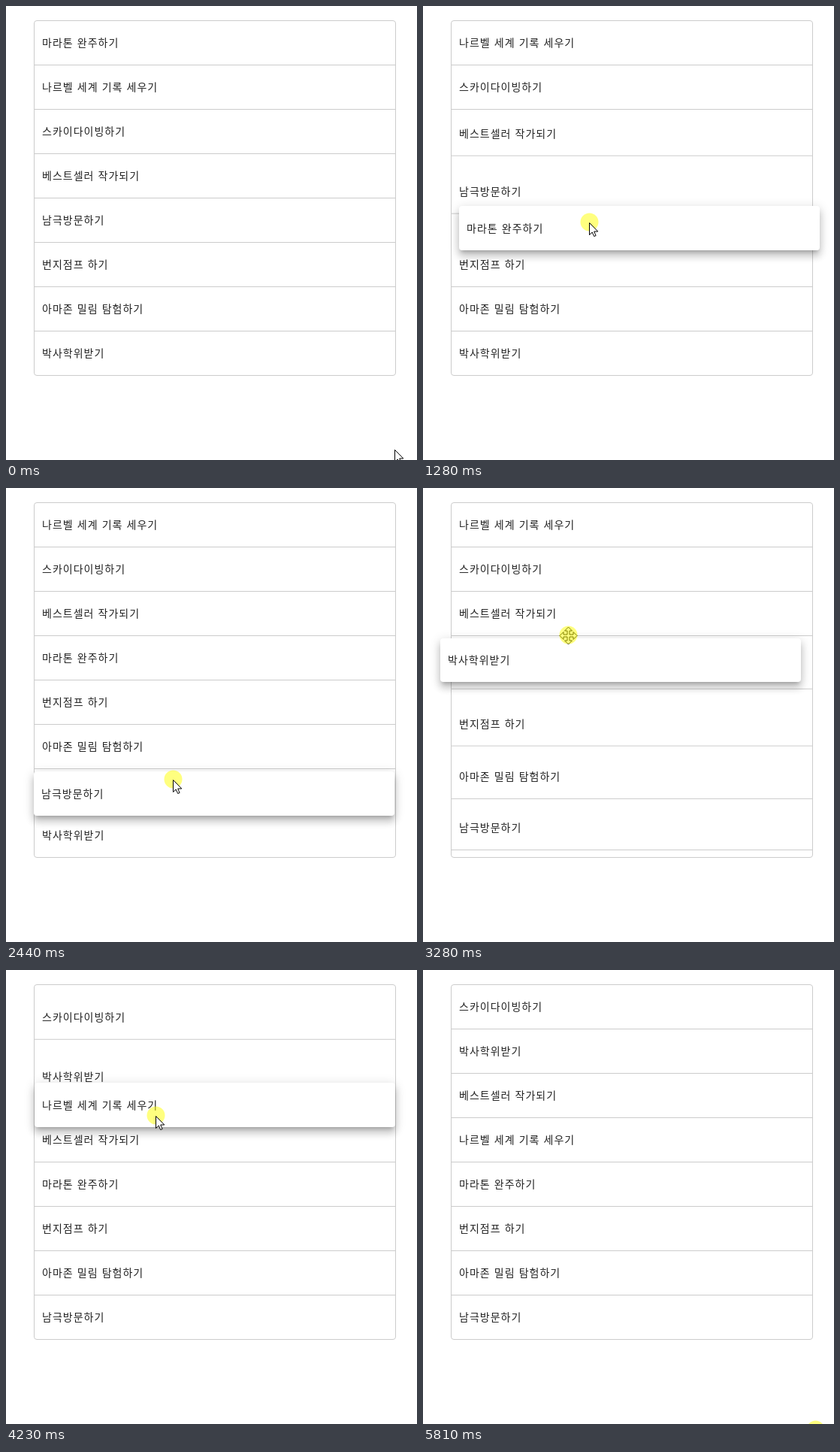
An HTML page with a canvas for the animation above (5.88 s loop, 547 px wide and 604 px high).

```html
<!DOCTYPE html>
<html lang="ko">
<head>
<meta charset="utf-8">
<style>
  html, body { margin: 0; width: 547px; height: 604px; overflow: hidden; background: #fff; }
  canvas { display: block; }
</style>
</head>
<body>
<canvas id="stage" width="547" height="604"></canvas>
<script>
const ctx = document.getElementById('stage').getContext('2d');
const LOOP = 5880, LEFT = 38, TOP = 20, WIDTH = 480, ROW = 59, COUNT = 8;
const SETTLE = 250;   // duration of row shifts and drops
const LAG = 23;       // the dragged card trails the pointer

const labels = ['마라톤 완주하기', '나르벨 세계 기록 세우기', '스카이다이빙하기', '베스트셀러 작가되기',
  '남극방문하기', '번지점프 하기', '아마존 밀림 탐험하기', '박사학위받기'];

// Pointer strokes: each eases from the last resting point to x, y
const home = { x: 517, y: 590 };
const strokes = [
  { from: 30, to: 180, x: 287, y: 101 },
  { from: 375, to: 500, x: 211, y: 37 },
  { from: 545, to: 650, x: 211, y: 21 },
  { from: 715, to: 1315, x: 221, y: 290 },
  { from: 1520, to: 1820, x: 221, y: 231 },
  { from: 1865, to: 2300, x: 220, y: 413 },
  { from: 2390, to: 2460, x: 222, y: 383 },
  { from: 2510, to: 2770, x: 210, y: 463 },
  { from: 3079, to: 3352, x: 189, y: 142 },
  { from: 3500, to: 3800, x: 199, y: 45 },
  { from: 4028, to: 4298, x: 199, y: 221 },
  { from: 4650, to: 5260, x: 470, y: 640 },
  { from: 5800, to: 5810, x: 522, y: 612 }
];

const drags = [
  { start: 560, end: 1450, from: 0 },
  { start: 1860, end: 2410, from: 3 },
  { start: 2970, end: 3490, from: 7 },
  { start: 3990, end: 4570, from: 0 }
];

const clamp = (v, lo, hi) => Math.max(lo, Math.min(hi, v));
const smooth = u => u * u * (3 - 2 * u);
const mix = (a, b, k) => a + (b - a) * k;
const slotAt = y => clamp(Math.floor((y - TOP) / ROW), 0, COUNT - 1);
const slotTop = i => TOP + i * ROW;

function pointer(t) {
  let { x, y } = home;
  for (const s of strokes) {
    if (t < s.from) break;
    const k = smooth(clamp((t - s.from) / (s.to - s.from), 0, 1));
    x = mix(x, s.x, k);
    y = mix(y, s.y, k);
  }
  return { x, y };
}

// cubic-bezier(0, 0, .2, 1)
function ease(p) {
  if (p <= 0) return 0;
  if (p >= 1) return 1;
  let lo = 0, hi = 1;
  for (let n = 0; n < 20; n++) {
    const s = (lo + hi) / 2;
    if (0.6 * (1 - s) * s * s + s * s * s < p) lo = s; else hi = s;
  }
  return smooth(lo);
}

// Work out when the card passes each slot and the order left by each drop
let finalOrder = labels;
for (const d of drags) {
  d.order = finalOrder;
  d.grab = pointer(d.start - LAG);
  d.height = d.from === COUNT - 1 ? ROW - 1 : ROW;
  d.hits = {};
  d.to = d.from;
  for (let t = d.start; t <= d.end; t++) {
    const s = slotAt(pointer(t - LAG).y);
    if (s !== d.to) {
      d.to = s;
      d.hits[s] ??= t;
    }
  }
  finalOrder = finalOrder.slice();
  finalOrder.splice(d.to, 0, finalOrder.splice(d.from, 1)[0]);
}

function label(text, x, y) {
  ctx.font = '300 14px "Noto Sans CJK KR", "Noto Sans CJK", "Noto Sans KR", sans-serif';
  ctx.letterSpacing = '1px';
  ctx.wordSpacing = '1px';
  ctx.fillStyle = 'rgba(0,0,0,.87)';
  ctx.fillText(text, x + 10, y + 34);
}

function roundBox(x, y, w, h, r) {
  ctx.beginPath();
  ctx.roundRect(x, y, w, h, r);
}

function row(text, y, last) {
  ctx.fillStyle = '#fff';
  ctx.fillRect(LEFT, y, WIDTH, ROW);
  if (!last) {
    ctx.fillStyle = '#ccc';
    ctx.fillRect(LEFT, y + ROW - 1, WIDTH, 1);
  }
  label(text, LEFT, y);
}

function shadow(x, y, h, dy, blur, spread, alpha) {
  const far = 2000;   // keeps the casting shape itself off the stage
  ctx.save();
  ctx.shadowColor = `rgba(0,0,0,${alpha})`;
  ctx.shadowBlur = blur;
  ctx.shadowOffsetX = far;
  ctx.shadowOffsetY = dy;
  ctx.fillStyle = '#000';
  roundBox(x - spread - far, y - spread, WIDTH + 2 * spread, h + 2 * spread, 4 + spread);
  ctx.fill();
  ctx.restore();
}

function card(text, x, y, h) {
  shadow(x, y, h, 3, 14, 2, 0.12);
  shadow(x, y, h, 8, 10, 1, 0.14);
  shadow(x, y, h, 5, 5, -3, 0.2);
  ctx.fillStyle = '#fff';
  roundBox(x, y, WIDTH, h, 4);
  ctx.fill();
  label(text, x, y + h - ROW + 1);
}

const held = (d, t) => pointer(Math.min(t, d.end) - LAG);

function cardPos(d, t) {
  const p = held(d, t), k = ease((t - d.end) / SETTLE);
  return {
    x: mix(LEFT + p.x - d.grab.x, LEFT, k),
    y: mix(slotTop(d.from) + p.y - d.grab.y, slotTop(d.to), k)
  };
}

function shift(d, i, t) {
  if (!(i in d.hits)) return 0;
  return Math.sign(d.from - i) * d.height * ease((t - d.hits[i]) / SETTLE);
}

function outline(points, x, y) {
  ctx.beginPath();
  points.forEach(([px, py]) => ctx.lineTo(x + px, y + py));
  ctx.closePath();
  ctx.lineWidth = 1;
  ctx.fillStyle = '#fff';
  ctx.fill();
  ctx.strokeStyle = '#000';
  ctx.stroke();
}

const arrow = [[0, 0], [0, 16], [3.7, 12.5], [6.2, 18], [8.6, 17], [6.2, 11.5], [11.3, 11.5]];
const arm = [[-1.5, -1.5], [-1.5, -6.5], [-5, -6.5], [0, -11.5], [5, -6.5], [1.5, -6.5]];
const cross = [0, 1, 2, 3].flatMap(n => arm.map(([x, y]) =>
  [[x, y], [-y, x], [-x, -y], [y, -x]][n]));

function drawPointer(t, d) {
  const p = t < 70 ? home : pointer(t);
  const x = Math.round(p.x) + 0.5, y = Math.round(p.y) + 0.5;
  const inside = p.x >= LEFT && p.x < LEFT + WIDTH && p.y >= TOP && p.y < slotTop(COUNT);
  const move = inside && !(d && slotAt(p.y) === slotAt(held(d, t).y));
  if (move) outline(cross, x, y);
  if (t >= 70) {
    ctx.fillStyle = 'rgba(255,255,0,.5)';
    ctx.beginPath();
    ctx.arc(x, y - 1, 12, 0, Math.PI * 2);
    ctx.fill();
  }
  if (!move) outline(arrow, x, y);
}

function draw(t) {
  const d = drags.find(g => t >= g.start && t < g.end + SETTLE);
  const next = drags.find(g => t < g.start);
  const rows = (d || next || { order: finalOrder }).order;

  ctx.fillStyle = '#fff';
  ctx.fillRect(0, 0, 547, 604);

  ctx.save();
  roundBox(LEFT, TOP, WIDTH, COUNT * ROW - 1, 3);
  ctx.clip();
  rows.forEach((text, i) => {
    if (d && i === d.from) return;
    row(text, slotTop(i) + (d ? shift(d, i, t) : 0), i === COUNT - 1);
  });
  ctx.restore();

  ctx.strokeStyle = '#ccc';
  ctx.lineWidth = 1;
  roundBox(LEFT - 0.5, TOP - 0.5, WIDTH + 1, COUNT * ROW, 3.5);
  ctx.stroke();

  if (d) {
    const c = cardPos(d, t);
    card(rows[d.from], Math.round(c.x), Math.round(c.y), d.height);
  }
  drawPointer(t, d);
}

const began = performance.now();
function tick() {
  draw((performance.now() - began) % LOOP);
  requestAnimationFrame(tick);
}
tick();
</script>
</body>
</html>
```
